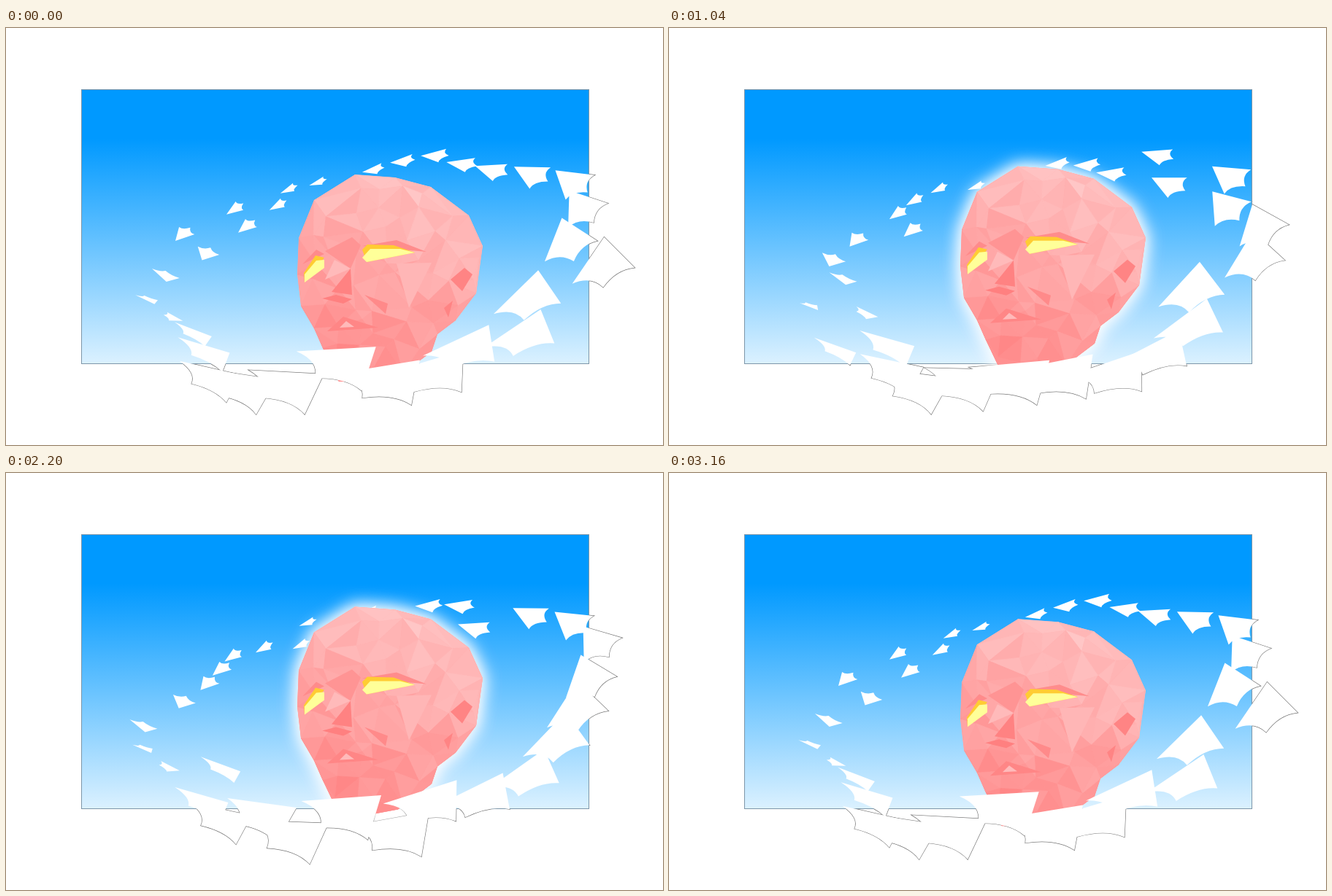
Recreate the animation shown at these times as an HTML page with a canvas. Size 900x572 px, loop 3200 ms.

```html
<!DOCTYPE html>
<html>
<head>
<meta charset="utf-8">
<style>
html, body { margin: 0; width: 900px; height: 572px; overflow: hidden; background: #fff }
canvas { display: block }
</style>
</head>
<body>
<canvas id="stage" width="900" height="572"></canvas>
<script>
const ctx = document.getElementById('stage').getContext('2d');
const LOOP = 3200, STEP = 40, CYCLE = 79, LAP = 158;

function poly(points) {
  const path = new Path2D();
  for (let i = 0; i < points.length; i += 2) path.lineTo(points[i], points[i + 1]);
  path.closePath();
  return path;
}

function fill(path, color) {
  ctx.fillStyle = color;
  ctx.fill(path);
}

const tone = v => `rgb(255,${Math.round(v)},${Math.round(v)})`;
const clamp = v => Math.max(0, Math.min(1, v));

// Linear rise from a to b, then linear fall from c to d
const ramp = (t, a, b, c, d) => clamp(Math.min((t - a) / (b - a), (d - t) / (d - c)));

let seed = 11;
function random() {
  seed = (seed * 16807) % 2147483647;
  return seed / 2147483647;
}

// Head
const outline = [478,201, 533,205, 582,218, 634,257, 653,299, 644,364, 616,401, 591,420,
  583,444, 537,479, 505,485, 456,485, 434,439, 422,412, 404,381, 399,338, 401,288, 422,236];
const headPath = poly(outline);

const paint = ([color, ...points]) => [poly(points), color];

const features = [
  [tone(182), 535,323, 583,322, 552,384],
  [tone(138), 491,366, 523,378, 520,392],
  [tone(148), 437,306, 474,287, 486,298, 472,330],
  [tone(139), 406,324, 425,304, 436,310],
  [tone(140), 488,299, 535,291, 576,307],
  [tone(186), 450,318, 472,330, 437,345],
  [tone(130), 472,330, 474,366, 446,362],
  [tone(128), 433,371, 452,366, 474,372, 462,378],
  [tone(134), 440,416, 462,396, 510,411],
  [tone(186), 457,411, 466,402, 477,410],
  [tone(132), 609,345, 628,329, 639,338, 625,361],
  [tone(132), 600,384, 612,374, 606,397]
].map(paint);

const eyes = [
  ['#ffcc33', 488,304, 495,297, 531,298, 560,308, 494,321],
  ['#ffff99', 488,315, 499,303, 540,303, 560,308, 494,321],
  ['#ffcc33', 408,336, 424,312, 436,315, 409,349],
  ['#ffff99', 409,349, 409,338, 425,319, 436,318, 436,329]
].map(paint);

function makeFacets() {
  const pts = [], facets = [];
  for (let i = 0; i < outline.length; i += 2) pts.push([outline[i], outline[i + 1]]);
  for (let y = 222; y < 478; y += 31) {
    for (let x = 412; x < 645; x += 33) {
      const p = [x + random() * 24 - 12, y + random() * 24 - 12];
      if (ctx.isPointInPath(headPath, ...p)) pts.push(p);
    }
  }
  // A triple is a facet when its circumcircle holds no other point
  for (let i = 0; i < pts.length; i++)
    for (let j = i + 1; j < pts.length; j++)
      for (let k = j + 1; k < pts.length; k++) {
        const [ax, ay] = pts[i];
        const bx = pts[j][0] - ax, by = pts[j][1] - ay;
        const cx = pts[k][0] - ax, cy = pts[k][1] - ay;
        const d = 2 * (bx * cy - by * cx);
        if (Math.abs(d) < 1) continue;
        const b2 = bx * bx + by * by, c2 = cx * cx + cy * cy;
        const ux = (cy * b2 - by * c2) / d, uy = (bx * c2 - cx * b2) / d;
        const r2 = ux * ux + uy * uy - 0.001;
        if (pts.some(p => (p[0] - ax - ux) ** 2 + (p[1] - ay - uy) ** 2 < r2)) continue;
        const x = ax + (bx + cx) / 3, y = ay + (by + cy) / 3;
        const v = 190 - (y - 200) * 0.17 + (x - 520) * 0.08 + random() * 20 - 10;
        facets.push([poly([...pts[i], ...pts[j], ...pts[k]]), tone(v)]);
      }
  return facets;
}
const facets = makeFacets();

function drawHead(time) {
  const lift = ramp(time, 0, 760, 760, 1400) + ramp(time, 1640, 2280, 2280, LOOP);
  const glow = ramp(time, 0, 640, 1360, 1640) + ramp(time, 1640, 2120, 2320, 2760);
  ctx.save();
  ctx.translate(0, -20 * lift);
  if (glow > 0) {
    ctx.save();
    ctx.shadowColor = `rgba(255,255,255,${glow})`;
    ctx.shadowBlur = 24;
    fill(headPath, tone(165));
    fill(headPath, tone(165));
    ctx.restore();
  }
  ctx.clip(headPath);
  fill(headPath, tone(165));
  ctx.lineWidth = 0.7;
  for (const [path, color] of facets) {
    fill(path, color);
    ctx.strokeStyle = color;
    ctx.stroke(path);
  }
  for (const [path, color] of [...features, ...eyes]) fill(path, color);
  ctx.restore();
}

// Evenly timed poses around the ring: nose, then offsets to the inner and outer wing tips
const poses = [
  [385,475, -95,-13, -28,49],
  [556,458, -110,16, -13,62],
  [700,403, -84,47, 13,48],
  [799,283, -41,64, 43,41],
  [752,202, 12,42, 54,8],
  [628,180, 25,17, 42,-4],
  [520,192, 22,5, 30,-12],
  [422,214, 18,-1, 20,-12],
  [327,250, 22,-5, 14,-17],
  [250,297, 26,-9, 4,-19],
  [211,372, 8,-5, -26,-14],
  [283,440, -62,-21, -8,20]
];

// Distance of each bird from the centre of the ring
const spread = [1, 0.8, 1, 1.02, 0.9, 1.04, 0.84, 1.08, 0.87, 0.98, 1.03, 0.97, 0.94, 0.97, 1.07, 1.05];

function poseAt(u) {
  const count = poses.length, s = u / LAP * count, n = Math.floor(s), f = s - n;
  const [a, b, c, d] = [-1, 0, 1, 2].map(k => poses[(n + k + count) % count]);
  return b.map((v, i) => v + 0.5 * f * (c[i] - a[i] +
    f * (2 * a[i] - 5 * v + 4 * c[i] - d[i] + f * (3 * (v - c[i]) + d[i] - a[i]))));
}

function birdPath(u, k) {
  const [x, y, lx, ly, rx, ry] = poseAt(u);
  const ax = 520 + (x - 520) * k, ay = 315 + (y - 315) * k;
  const tx = (lx + rx) * 0.65, ty = (ly + ry) * 0.65;
  const path = new Path2D();
  const scallop = (x0, y0, x1, y1) =>
    path.quadraticCurveTo(ax + (x0 + x1) * 0.4, ay + (y0 + y1) * 0.4, ax + x1, ay + y1);
  path.moveTo(ax, ay);
  path.lineTo(ax + lx, ay + ly);
  scallop(lx, ly, tx, ty);
  scallop(tx, ty, rx, ry);
  path.closePath();
  return path;
}

const sky = ctx.createLinearGradient(0, 84, 0, 460);
sky.addColorStop(0, '#0099ff');
sky.addColorStop(0.18, '#0099ff');
sky.addColorStop(1, '#dbf1ff');

const outside = new Path2D();
outside.rect(0, 0, 900, 572);
outside.rect(103, 84, 696, 377);

function draw(frame) {
  const near = [], far = [];
  spread.forEach((k, i) => {
    for (const half of [0, CYCLE]) {
      const u = (4.2 + i * CYCLE / spread.length + half + frame) % LAP;
      (u > 62 && u < 128 ? far : near).push(birdPath(u, k));
    }
  });

  ctx.fillStyle = '#fff';
  ctx.fillRect(0, 0, 900, 572);
  ctx.fillStyle = sky;
  ctx.fillRect(103, 84, 696, 377);
  ctx.lineWidth = 1;
  ctx.strokeStyle = '#7d96a8';
  ctx.strokeRect(103.5, 84.5, 695, 376);

  // Hairline edges show only beyond the sky
  ctx.save();
  ctx.clip(outside, 'evenodd');
  ctx.strokeStyle = '#777';
  ctx.lineWidth = 1.3;
  for (const path of near) ctx.stroke(path);
  ctx.restore();

  for (const path of far) fill(path, '#fff');
  drawHead(frame * STEP);
  for (const path of near) fill(path, '#fff');
}

function tick() {
  draw(Math.floor(performance.now() % LOOP / STEP));
  requestAnimationFrame(tick);
}
tick();
</script>
</body>
</html>
```
